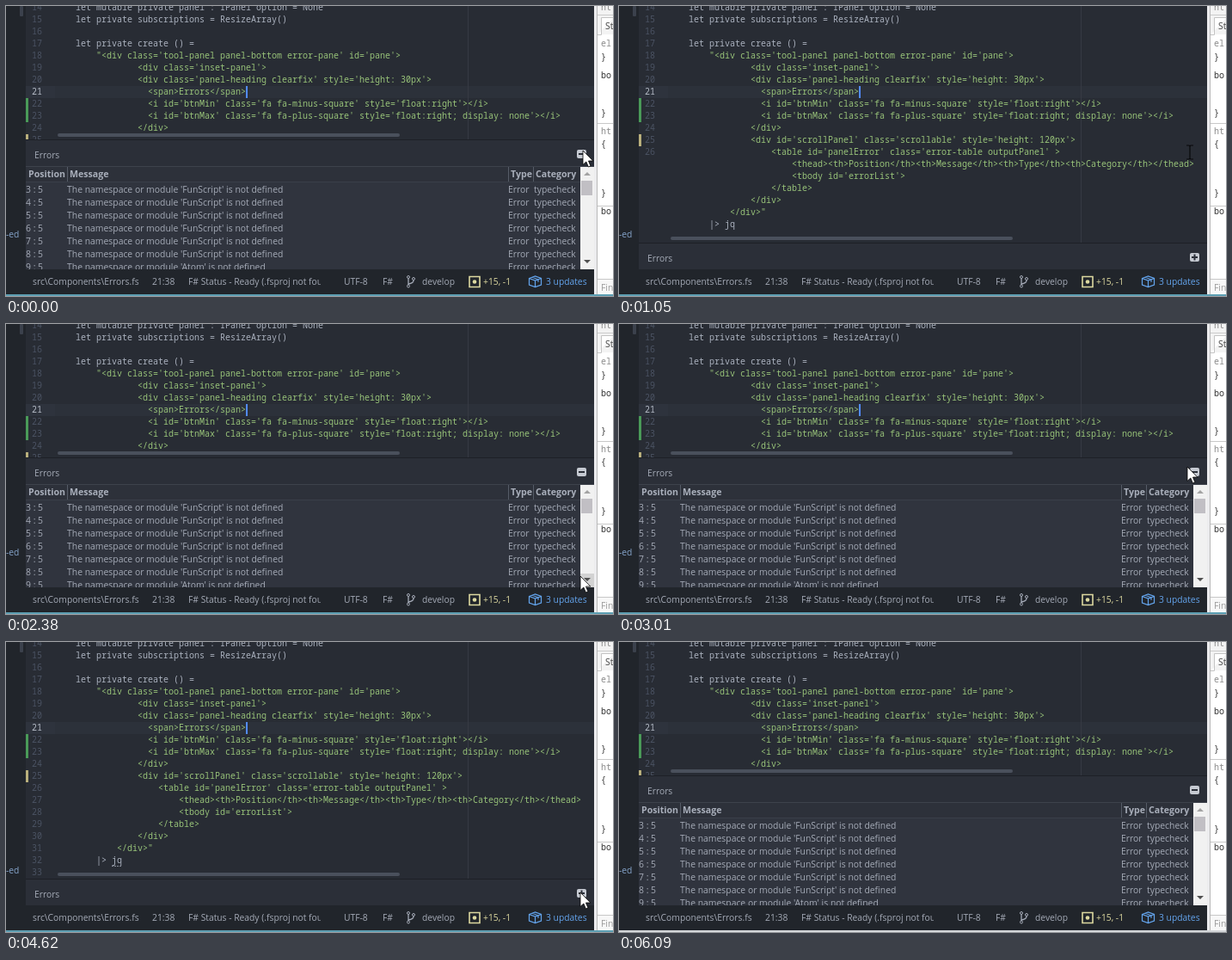
An HTML page for the animation above (6.16 s loop, 706 px wide and 337 px high).

```html
<!DOCTYPE html>
<html lang="en">
<head>
<meta charset="utf-8">
<title>Collapsible error panel</title>
<style>
html, body { margin: 0; width: 100%; height: 100%; overflow: hidden; background: #282c34; }
svg { display: block; }
text { font: 10.3px "Open Sans", sans-serif; fill: #a5abb7; white-space: pre; }
.code { font: 10px "Noto Sans Mono", monospace; fill: #abb2bf; }
.string { fill: #98c379; }
.number { fill: #4b5363; }
.current { fill: #b4bac5; }
.head { font-weight: 700; font-size: 10.6px; fill: #a9afbb; }
.cell { font-size: 10.4px; }
.blue { fill: #64a5ee; }
.cream { fill: #ddd9a0; }
.dev { font: 10px "Noto Sans Mono", monospace; fill: #333; }
.grey { fill: #8c8c8c; }
</style>
</head>
<body>
<svg id="stage" width="706" height="337" viewBox="0 0 706 337"></svg>
<script>
const stage = document.getElementById('stage');

function add(parent, tag, attrs = {}, content = '') {
  const node = document.createElementNS('http://www.w3.org/2000/svg', tag);
  for (const key in attrs) node.setAttribute(key, attrs[key]);
  node.textContent = content;
  return parent.appendChild(node);
}
const group = parent => add(parent, 'g');
const rect = (parent, x, y, width, height, fill, rx = 0) =>
  add(parent, 'rect', { x, y, width, height, fill, rx });
const text = (parent, x, y, content, name = '') =>
  add(parent, 'text', { x, y, class: name }, content);
const path = (parent, d, fill, stroke = 'none', width = 1) =>
  add(parent, 'path', { d, fill, stroke, 'stroke-width': width });
const show = (node, visible) => node.setAttribute('visibility', visible ? 'visible' : 'hidden');
const move = (node, x, y) => node.setAttribute('transform', `translate(${x} ${y})`);

// Editor: 14px rows, 6px columns
const rowTop = line => 93 + (line - 21) * 14;
const code = [
  [14, 4, 'let mutable private panel : IPanel option = None'],
  [15, 4, 'let private subscriptions = ResizeArray()'],
  [17, 4, 'let private create () ='],
  [18, 8, `"<div class='tool-panel panel-bottom error-pane' id='pane'>`],
  [19, 16, `<div class='inset-panel'>`],
  [20, 16, `<div class='panel-heading clearfix' style='height: 30px'>`],
  [21, 18, '<span>Errors</span>'],
  [22, 18, `<i id='btnMin' class='fa fa-minus-square' style='float:right'></i>`],
  [23, 18, `<i id='btnMax' class='fa fa-plus-square' style='float:right; display: none'></i>`],
  [24, 16, '</div>'],
  [25, 16, `<div id='scrollPanel' class='scrollable' style='height: 120px'>`],
  [26, 20, `<table id='panelError' class='error-table outputPanel' >`],
  [27, 24, '<thead><th>Position</th><th>Message</th><th>Type</th><th>Category</th></thead>'],
  [28, 24, `<tbody id='errorList'>`],
  [29, 20, '</table>'],
  [30, 16, '</div>'],
  [31, 12, '</div>"'],
  [32, 8, '|> jq']
];
rect(stage, 0, 0, 706, 337, '#282c34');
rect(stage, 23, rowTop(21), 34, 14, '#2e333d');
rect(stage, 57, rowTop(21), 627, 14, '#2c313a');
rect(stage, 537, 0, 1, 276, '#363a43');
rect(stage, 23, rowTop(22), 3, 28, '#4a9a58');
rect(stage, 23, rowTop(25), 3, 14, '#b9b07c');
for (const [line, column, content] of code) {
  const isString = line > 17 && line < 32;
  text(stage, 57 + column * 6, rowTop(line) + 10, content, isString ? 'code string' : 'code');
}
const lateNumbers = group(stage);
for (let line = 14; line <= 33; line++) {
  text(line > 26 ? lateNumbers : stage, 30, rowTop(line) + 10, line,
    line === 21 ? 'code current' : 'code number');
}
path(lateNumbers, 'M123 260.5H135', 'none', '#858b96').setAttribute('stroke-dasharray', '2 1');
const caret = rect(stage, 279, rowTop(21), 2, 14, '#528bff');

// Error panel, with the editor's scrollbar riding on its top edge
const panel = group(stage);
rect(panel, 57, 147, 627, 8, '#282c34');
rect(panel, 537, 147, 1, 8, '#363a43');
rect(panel, 60, 148, 398, 4, '#4a505c', 2);
rect(panel, 23, 155, 661, 32, '#2b2f38');
rect(panel, 23, 155, 661, 1, '#1d2026');
text(panel, 33, 177, 'Errors');
rect(panel, 664, 167, 11, 10, '#c6cad2', 2);
rect(panel, 666, 171, 7, 2, '#2b2f38');
const plusBar = rect(panel, 668.5, 168.5, 2, 7, '#2b2f38');

rect(panel, 23, 187, 661, 120, '#30343e');
rect(panel, 23, 186, 661, 1, '#3d424c');
rect(panel, 23, 187, 645, 17, '#2d313a');
rect(panel, 23, 204, 645, 1, '#3a3f49');
for (const x of [71, 584, 613]) rect(panel, x, 187, 1, 17, '#565c67');
[[26, 'Position'], [74, 'Message'], [587, 'Type'], [616, 'Category']]
  .forEach(([x, label]) => text(panel, x, 199, label, 'head'));
for (let i = 0; i < 7; i++) {
  const name = i < 6 ? 'FunScript' : 'Atom';
  const cells = [[23, `${i + 3} : 5`], [71, `The namespace or module '${name}' is not defined`],
    [584, 'Error'], [614, 'typecheck']];
  for (const [x, content] of cells) text(panel, x, 217 + i * 15, content, 'cell');
}
rect(panel, 668, 187, 16, 119, '#f1f1f1');
rect(panel, 669, 203, 13, 17, '#c1bfc4');
const downButton = rect(panel, 668, 290, 16, 16, '#d2d2d2');
path(panel, 'M672 197l4-4 4 4z', '#a3a3a3');
path(panel, 'M672 295h8l-4 4z', '#505050');

// Sidebar
rect(stage, 0, 0, 23, 337, '#21252b');
rect(stage, 16, 0, 4, 12, '#3b414c', 1);
text(stage, 0, 269, '-ed').style.fill = '#86a5cc';

// Status bar
rect(stage, 23, 306, 661, 30, '#21252b');
text(stage, 212, 324, 'F# Status - Ready (.fsproj not found)');
rect(stage, 366, 308, 60, 24, '#21252b');
[[31, 'src\\Components\\Errors.fs'], [170, '21:38'], [393, 'UTF-8'], [438, 'F#'], [484, 'develop'],
  [555, '+15, -1', 'cream'], [628, '3 updates', 'blue']]
  .forEach(([x, label, name]) => text(stage, x, 324, label, name));
path(stage, 'M468 316v9M474 318v1q0 3-6 4', 'none', '#a5abb7', 1.3);
for (const [x, y] of [[468, 315], [468, 325.5], [474, 317]])
  add(stage, 'circle', { cx: x, cy: y, r: 1.5, fill: '#21252b', stroke: '#a5abb7' });
path(stage, 'M539 314.5h12v12h-12z', 'none', '#ddd9a0', 1.6);
add(stage, 'circle', { cx: 545, cy: 320.5, r: 2.3, fill: '#ddd9a0' });
path(stage, 'M608.5 316.5l7-2.5 7 2.5v7.5l-7 2.5-7-2.5zl7 2.5 7-2.5M615.5 319v7.5M612 315.3l7 2.5v3',
  'none', '#64a5ee', 1.2);

// Inspector at the right edge
rect(stage, 684, 0, 22, 337, '#fff');
rect(stage, 684, 0, 4, 337, '#ececee');
rect(stage, 687, 0, 1, 337, '#b8b8b8');
rect(stage, 688, 0, 18, 33, '#f3f3f3');
rect(stage, 688, 10, 18, 1, '#ccc');
path(stage, 'M688 33.5h4.5v-20h14', '#fff', '#c4c4c4');
rect(stage, 688, 136, 18, 1, '#c8c8c8');
rect(stage, 688, 232, 18, 1, '#c8c8c8');
rect(stage, 688, 318, 18, 18, '#f7f7f7');
rect(stage, 688, 317, 18, 1, '#c8c8c8');
text(stage, 697, 27, 'St').style.fill = '#444';
text(stage, 692, 331, 'Fin').style.fill = '#999';
[[5, 'ht', 'grey'], [47, 'el', 'grey'], [63, '}'], [84, 'bo'], [128, '}'], [149, 'ht', 'grey'],
  [164, '{'], [221, '}'], [242, 'bo']]
  .forEach(([y, label, name = '']) => text(stage, 692, y, label, 'dev ' + name));

rect(stage, 0, 335, 706, 2, '#d4d7da');
const focusLine = rect(stage, 0, 335, 706, 2, '#5d9fb3');

// Pointers
const arrow = path(stage, 'M0 0V16.5L3.8 13 6.4 19 9 18 6.5 12H11.8Z', '#fff', '#000', 0.8);
const beam = path(stage, 'M-4-8h3l1 1 1-1h3M0-7V7M-4 8h3l1-1 1 1h3', 'none', '#08090b', 1.2);

// Timeline
const LOOP = 6160, STEP = 70;
const caretFlips = [420, 770, 1330, 1680, 2100, 2380, 2660, 3010, 3360, 3710, 4200, 4620, 5040, 5460, 5810];
const pointerKeys = [
  [0, 671, 168], [350, 671, 168], [560, 670, 169], [700, 670, 169], [770, 664, 170],
  [1470, 664, 170], [1890, 668, 294], [2240, 668, 294], [2310, 668, 293], [2590, 668, 293],
  [3010, 661, 166], [3150, 669, 170], [3290, 669, 170], [3430, 664, 170],
  [3990, 664, 170], [4620, 668, 291], [5390, 668, 291], [5670, 706, 345], [LOOP, 706, 345]
];
const within = (t, from, to) => t >= from && t < to;

function pointerAt(t) {
  const i = pointerKeys.findIndex(key => key[0] > t);
  const [t0, x0, y0] = pointerKeys[i - 1], [t1, x1, y1] = pointerKeys[i];
  const u = (t - t0) / (t1 - t0), eased = u * u * (3 - 2 * u);
  return [x0 + (x1 - x0) * eased, y0 + (y1 - y0) * eased].map(Math.round);
}

function draw(now) {
  const t = Math.floor(now % LOOP / STEP) * STEP;
  const closed = within(t, 1050, 2240) || within(t, 3780, 4760);
  const [x, y] = pointerAt(t);
  const overCode = y < (closed ? 275 : 155);

  move(panel, 0, closed ? 120 : 0);
  show(plusBar, closed);
  show(lateNumbers, within(t, 1190, 2240) || within(t, 3920, 4760));
  show(caret, caretFlips.filter(flip => flip <= t).length % 2 === 0);
  show(downButton, !closed && x >= 668 && x < 684 && y >= 290 && y < 306);
  show(focusLine, t < 6090);
  show(arrow, !overCode && t < 5670);
  show(beam, overCode);
  move(arrow, x, y);
  move(beam, x, y);
}

const start = performance.now();
function tick() {
  draw(performance.now() - start);
  requestAnimationFrame(tick);
}
tick();
</script>
</body>
</html>
```
